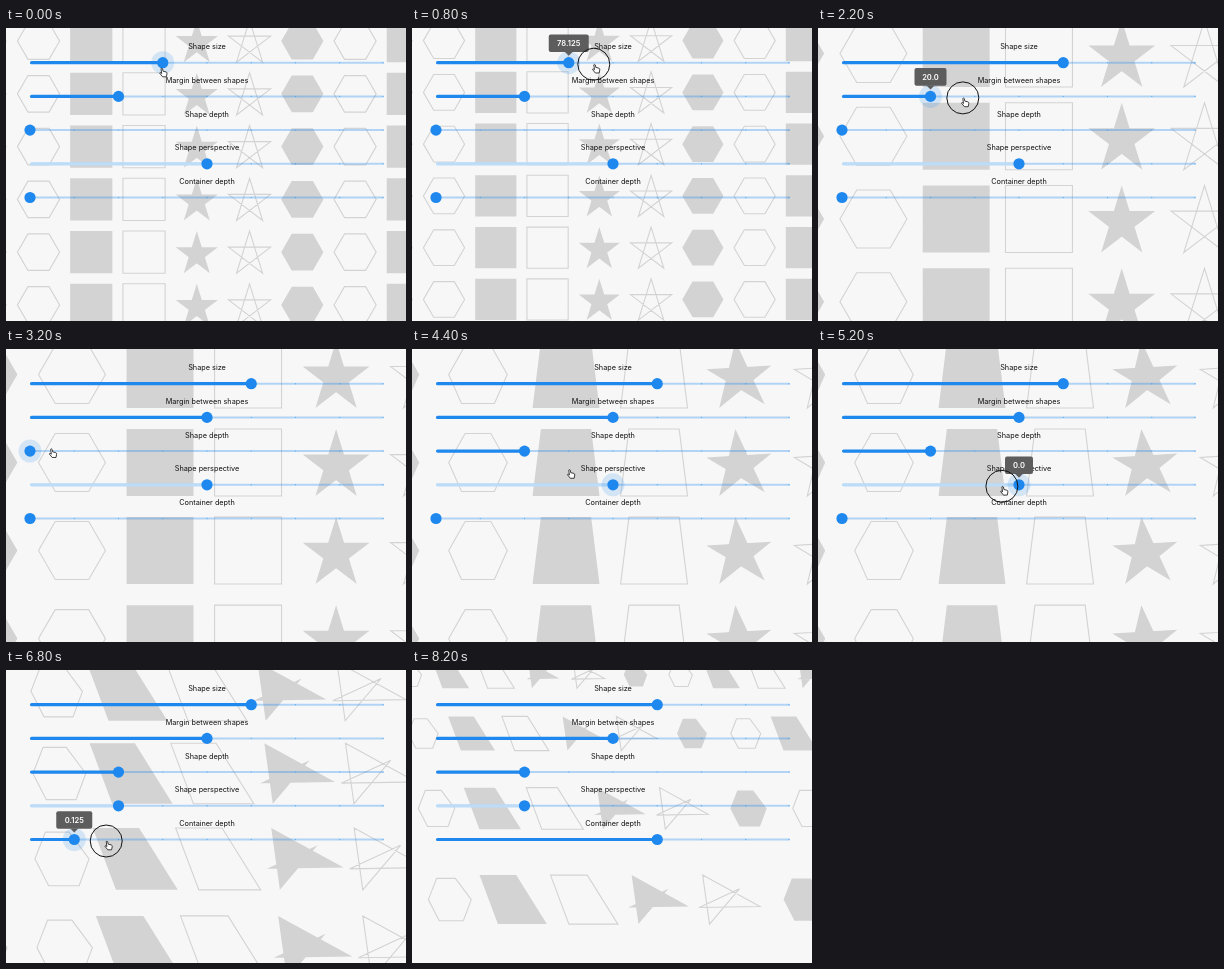
Animation, 400 px wide and 293 px high, one loop 8.4 s. Source, as an HTML page:

```html
<!DOCTYPE html>
<html lang="en">
<head>
<meta charset="utf-8">
<title>Shape sliders</title>
<style>
  html, body { margin: 0; width: 100%; height: 100%; overflow: hidden; background: #f7f7f7; }
  svg { display: block; width: 400px; height: 293px; }
  text { font-family: Inter, Roboto, sans-serif; text-anchor: middle; }
  .title { font-size: 7.3px; fill: #111; }
  .tip text { font-size: 7.6px; font-weight: 600; fill: #fff; }
</style>
</head>
<body>
<svg viewBox="0 0 400 293">
  <path id="solid" fill="#d3d3d3"/>
  <path id="line" fill="none" stroke="#d3d3d3" stroke-width="1.1"/>
  <g id="sliders"></g>
  <g id="cursor">
    <circle id="ring" r="16" fill="none" stroke="#111"/>
    <path id="hand" fill="#fff" stroke="#111" stroke-width=".8" stroke-linejoin="round"
      d="M0 .6Q.9 -.4 1.5 .7L2 3.2L5.2 4Q6.2 4.4 6 5.6L5.4 8.8H1.6L-1.2 5.4Q-1.2 4.4 -.2 4.8L.7 5.5Z"/>
    <path id="arrow" fill="#111" stroke="#fff" stroke-width=".5" d="M0 0V7.4L1.7 5.8L2.9 8.4L4 7.9L2.8 5.4H5Z"/>
  </g>
</svg>
<script>
const FRAME = 200, COUNT = 42;
const X0 = 24, SPAN = 354, SCALE = 0.5276;
const LAG = .2, THUMB_LAG = .5; // in frames, behind the cursor

const $ = id => document.getElementById(id);
const mix = (a, b, t) => a + (b - a) * t;
const ease = (k, from, to) => {
  const t = Math.min(1, Math.max(0, (k - from) / (to - from)));
  return t * t * (3 - 2 * t);
};
const show = (el, on) => el.setAttribute('visibility', on ? 'visible' : 'hidden');
const move = (el, x, y) => el.setAttribute('transform', `translate(${x} ${y})`);

// Each slider is dragged once, from frame "down" to frame "up"
const sliders = [
  { name: 'Shape size', min: 5, max: 200, from: .375, to: .625, down: 2, up: 7.7 },
  { name: 'Margin between shapes', min: 0, max: 80, from: .25, to: .5, down: 10.1, up: 12.3 },
  { name: 'Shape depth', min: 0, max: 1, from: 0, to: .25, down: 17, up: 20 },
  { name: 'Shape perspective', min: -1, max: 1, from: .5, to: .25, down: 24, up: 31.1, pale: true },
  { name: 'Container depth', min: 0, max: 1, from: 0, to: .625, down: 32.5, up: 36.3 }
];
const [sizing, spacing, deepening, turning, tilting] = sliders;

const dragged = (s, k) => mix(s.from, s.to, ease(k, s.down, s.up));
const snapped = (s, k) => Math.round(dragged(s, k) * 8) / 8;
const value = (s, k) => mix(s.min, s.max, snapped(s, k - LAG));
const pressed = (s, k) => k >= s.down && k <= s.up;
const hovered = (s, k) => k >= s.down - 2 && k <= s.up + 1 && !sliders.some(o => o !== s && pressed(o, k));

sliders.forEach((s, i) => {
  s.y = 34.7 + i * 33.7;
  let ticks = '';
  for (let j = 1; j <= 8; j++) ticks += `<circle cx="${X0 + SPAN * j / 8 - (j === 8)}" cy="${s.y}" r=".7"/>`;
  const g = document.createElementNS('http://www.w3.org/2000/svg', 'g');
  g.innerHTML = `
    <text class="title" x="201" y="${s.y - 13.6}">${s.name}</text>
    <rect x="${X0}" y="${s.y - 1}" width="${SPAN}" height="2" rx="1" fill="#1e88ee" opacity=".32"/>
    <g fill="#1e88ee" opacity=".5">${ticks}</g>
    <rect class="bar" x="${X0}" y="${s.y - 1.6}" height="3.2" rx="1.6" fill="${s.pale ? '#bcdcf8' : '#1e88ee'}"/>
    <g class="thumb">
      <g class="halo" fill="#1e88ee" opacity=".16"><circle r="11.5"/><circle r="8.5"/></g>
      <circle r="5.6" fill="#1e88ee"/>
      <g class="tip" fill="#5d5d5d"><rect y="-28.3" height="17.6" rx="2"/>
        <path d="M-4 -11H4L0 -7Z"/><text y="-16.8"></text></g>
    </g>`;
  $('sliders').append(g);
  for (const c of ['bar', 'thumb', 'halo', 'tip']) s[c] = g.querySelector('.' + c);
  s.tipBox = s.tip.querySelector('rect');
  s.tipText = s.tip.querySelector('text');
});

// n points on a circle, as fractions of the cell
const ring = (n, start, stride = 1) => Array.from({ length: n }, (_, i) => {
  const a = start + i * stride * 2 * Math.PI / n;
  return [.5 + Math.cos(a) / 2, .5 + Math.sin(a) / 2];
});

// Narrows the top with depth, leans it with perspective
const slant = lean => ([x, y], depth, turn) =>
  [.5 + (x - .5) * (1 - depth * (1 - y)) + turn * lean * (1 - y) ** 2, y];

const square = { points: [[0, 0], [1, 0], [1, 1], [0, 1]], warp: slant(1) };
const hexagon = { points: ring(6, 0), warp: slant(.25) };
// The star fills its cell; its tips drift towards a twisted star
const twisted = [[-.17, 0], [1, .64], [-.24, .66], [.58, .28], [-.03, 1]];
const star = {
  points: ring(5, -Math.PI / 2, 2).map(([x, y]) => [.5 + (x - .5) * 1.051, y * 1.1056]),
  warp: ([x, y], depth, turn, i) => {
    const t = .6 * depth - 1.7 * turn;
    return [mix(x, twisted[i][0], t), mix(y, twisted[i][1], t)];
  }
};
const order = [hexagon, square, square, star, star, hexagon];

function drawShapes(k) {
  const size = (k < sizing.down ? 80 : value(sizing, k)) * SCALE;
  const gap = value(spacing, k + LAG) * SCALE;
  const depth = value(deepening, k), turn = value(turning, k), tilt = value(tilting, k);
  const pitch = size + gap;
  const left = 2 * gap - 9.7 + size / 2;
  const paths = ['', ''];

  for (let r = 0; r * pitch < 310; r++) {
    const cy = r * pitch - 8 + size / 2 - tilt * (33 + 60 * r - 13 * r * r);
    const spread = 1 - tilt * (.78 - .157 * r);
    const side = size * (1 - tilt * (.96 - .177 * r));
    for (let n = -2; n < 11; n++) {
      const kind = (n + 6) % 6, shape = order[kind];
      const cx = (left + n * pitch + 72) * spread - 72;
      const corners = shape.points.map((p, i) => {
        const [x, y] = shape.warp(p, depth, turn, i);
        return (cx + (x - .5) * side).toFixed(2) + ' ' + (cy + (y - .5) * side).toFixed(2);
      });
      paths[kind % 2] += 'M' + corners.join('L') + 'Z';
    }
  }
  $('line').setAttribute('d', paths[0]);
  $('solid').setAttribute('d', paths[1]);
}

function drawSliders(k) {
  for (const s of sliders) {
    const width = snapped(s, k - THUMB_LAG) * SPAN;
    s.bar.setAttribute('width', width);
    move(s.thumb, X0 + width, s.y);
    show(s.halo, hovered(s, k));
    show(s.tip, pressed(s, k));
    const v = value(s, k), label = Number.isInteger(v) ? v.toFixed(1) : String(v);
    const box = 16 + label.length * 4;
    s.tipText.textContent = label;
    s.tipBox.setAttribute('x', -box / 2);
    s.tipBox.setAttribute('width', box);
  }
}

function drawCursor(k) {
  // Chain the drags: the pointer glides from each release to the next grab
  let x = 155, y = 40, since = 0;
  for (const s of sliders) {
    const t = ease(k, since, s.down);
    x = mix(x, X0 + SPAN * dragged(s, k), t);
    y = mix(y, s.y + 1.5, t);
    since = s.up;
  }
  const away = ease(k, since, 38);
  move($('cursor'), mix(x, 112, away), mix(y, 36, away));
  const visible = k < 40, hover = sliders.some(s => hovered(s, k));
  show($('hand'), visible && hover);
  show($('arrow'), visible && !hover);
  show($('ring'), visible && sliders.some(s => pressed(s, k)));
}

let last = -1;
function tick() {
  const k = Math.floor(performance.now() / FRAME) % COUNT;
  if (k !== last) {
    last = k;
    drawShapes(k);
    drawSliders(k);
    drawCursor(k);
  }
  requestAnimationFrame(tick);
}
tick();
</script>
</body>
</html>
```
